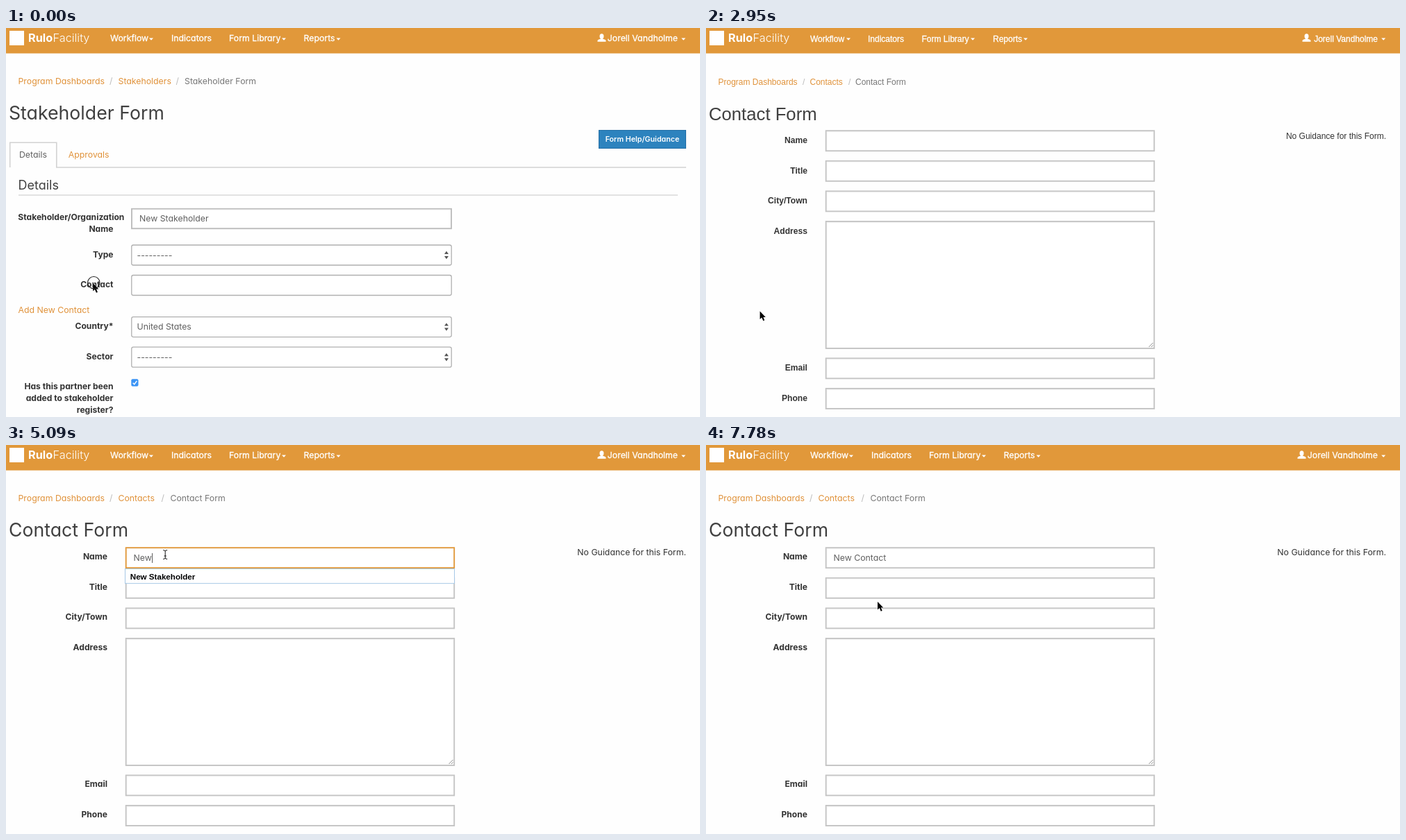
Write an HTML page that moves like this. It is 999 px wide and 561 px high and loops after 8000 ms.

```html
<!DOCTYPE html>
<html lang="en">
<head>
<meta charset="utf-8">
<title>Contact form</title>
<style>
html, body { margin: 0; width: 100%; height: 100%; overflow: hidden; background: #fefefe; }
svg { display: block; width: 999px; height: 561px; }
text { white-space: pre; }
.round { font-family: Inter, "Open Sans", sans-serif; font-size: 12.3px; font-feature-settings: "cv11"; }
.plain { font-family: "Liberation Sans", Arial, sans-serif; font-size: 12px; }
.nav { fill: #fff; stroke: #fff; stroke-width: .3; }
.link { fill: #e0923a; }
.hover { fill: #b56c1c; text-decoration: underline; }
.muted { fill: #777; }
.slash { fill: #bbb; }
.body { fill: #333; }
.value { fill: #606060; }
.label { fill: #333; font-weight: 700; font-size: 12.1px; }
.title { fill: #404040; font-size: 26.7px; }
.plain .title { font-size: 25.7px; }
.section { fill: #404040; font-size: 18px; }
.button { fill: #fff; font-size: 10.7px; font-weight: 600; }
.brand { fill: #fff; font: 300 16.3px Inter, sans-serif; }
.option { fill: #000; font: 700 11.6px "Liberation Sans", Arial, sans-serif; }
</style>
</head>
<body>
<svg id="stage" viewBox="0 0 999 561" xmlns="http://www.w3.org/2000/svg"></svg>
<script>
const DURATION = 8000;
const GREY = '#c4c4c4', ORANGE = '#e1983a';
const stage = document.getElementById('stage');

// Each step changes part of the state at its time.
const steps = [
  [0, { page: 'stakeholder', font: 'round', cursor: 'arrow', at: [125.2, 368], ring: true, hover: false,
        name: '', caret: false, border: GREY, options: [] }],
  [270, { at: [79, 396], ring: false }],
  [540, { at: [79.7, 398], ring: true }],
  [800, { cursor: 'hand', at: [77.7, 408], ring: false, hover: true }],
  [1070, { ring: true }],
  [1330, { page: 'blank', cursor: 'arrow', at: [77.6, 408.5], ring: false }],
  [2950, { page: 'contact', font: 'plain' }],
  [3220, { font: 'round' }],
  [3480, { cursor: 'beam', at: [218, 220] }],
  [3750, { at: [230.5, 168] }],
  [4010, { at: [229.2, 158], ring: true, caret: true }],
  [4280, { ring: false, border: ORANGE }],
  [4550, { caret: false }],
  [4820, { name: 'N', caret: true, options: ['South Velda', 'name', 'np Dvok test', 'Name Table',
           'New Stakeholder', 'NP Dvok test stakeholder'] }],
  [5090, { name: 'New', options: ['New Stakeholder'] }],
  [5360, { name: 'New ' }],
  [5900, { name: 'New Con', options: [] }],
  [6170, { name: 'New Conta' }],
  [6430, { name: 'New Contac' }],
  [6700, { name: 'New Contact' }],
  [7240, { cursor: 'arrow', at: [247, 222], caret: false }],
  [7510, { at: [247, 226], ring: true, border: '#d3ae80' }],
  [7780, { ring: false, border: GREY }]
];

const text = (x, y, str, cls, anchor = 'start') =>
  `<text x="${x}" y="${y}" class="${cls}" text-anchor="${anchor}">${str}</text>`;
const rect = (x, y, w, h, fill, extra = '') =>
  `<rect x="${x}" y="${y}" width="${w}" height="${h}" fill="${fill}" ${extra}/>`;
const path = (d, stroke, width = 1, fill = 'none') =>
  `<path d="${d}" stroke="${stroke}" stroke-width="${width}" fill="${fill}"/>`;
const chevron = x => path(`M${x} 14.5h6l-3 3.2z`, 'none', 0, '#fff');

function field(x, y, w, h, color = GREY) {
  return rect(x, y, w, h, '#fff', `stroke="${color}" stroke-width="1.9"`) +
    path(`M${x + 1} ${y + 1.4}h${w - 2}`, '#f0f0f0', .8);
}

function softField(y, h) {
  return rect(180.8, y, 460.4, h, '#fff', 'rx="2.5" stroke="#b0b0b0" stroke-width="1.3"');
}

function select(y, value) {
  const mid = y + 14.5;
  return softField(y, 29) + text(188.5, mid + 4, value, 'value') +
    path(`M631 ${mid - 1.5}h6l-3 -4.2zM631 ${mid + 1.5}h6l-3 4.2z`, 'none', 0, '#555');
}

function header(round) {
  const y = round ? 19 : 20;
  const [indicators, library, reports] = round ? [238, 321, 428.5] : [233, 310.5, 413];
  const icon = round ? 851.5 : 858.5;
  return rect(0, 0, 999, 36.6, ORANGE) +
    rect(5, 4, 21, 21, '#fff') +
    '<text x="32" y="20.3" class="brand"><tspan font-weight="700">Rulo</tspan><tspan x="67.5">Facility</tspan></text>' +
    text(150, y, 'Workflow', 'nav') + chevron(round ? 206 : 202) +
    text(indicators, y, 'Indicators', 'nav') +
    text(library, y, 'Form Library', 'nav') + chevron(round ? 397 : 381) +
    text(reports, y, 'Reports', 'nav') + chevron(round ? 475.5 : 457) +
    `<ellipse cx="${icon + 6}" cy="12" rx="3" ry="3.7" fill="#fff"/>` +
    path(`M${icon} 19.7v-1.6q.3 -1.2 4.6 -2.6v-1.5h2.8v1.5q4.3 1.4 4.6 2.6v1.6z`, 'none', 0, '#fff') +
    text(967, y, 'Jorell Vandholme', 'nav', 'end') + chevron(972.2);
}

function crumbs(y, first, xs, parent, current) {
  return text(17.5, y, first, 'link') + text(xs[0], y, '/', 'slash') + text(xs[1], y, parent, 'link') +
    text(xs[2], y, '/', 'slash') + text(xs[3], y, current, 'muted');
}

function stakeholderPage(s) {
  const label = (y, str) => text(154.5, y, str, 'label', 'end');
  return header(true) +
    crumbs(81, 'Program Dashboards', [149, 161.5, 244.5, 257], 'Stakeholders', 'Stakeholder Form') +
    text(4, 132, 'Stakeholder Form', 'title') +
    rect(853.5, 147.5, 125, 26, '#2d83be', 'stroke="#2470a7"') +
    text(916, 164, 'Form Help/Guidance', 'button', 'middle') +
    path('M5.7 201V165.2H72.8V201H979', '#d2d2d2', 1.6) +
    text(19, 186.5, 'Details', 'value') + text(89.8, 186.5, 'Approvals', 'link') +
    text(17.5, 233, 'Details', 'section') + path('M18 241H967', '#d8d8d8', 1.3) +
    text(17.3, 277, 'Stakeholder/Organization', 'label') + label(294, 'Name') +
    field(181, 260.8, 460, 28.4, '#bdbdbd') + text(192, 279, 'New Stakeholder', 'value') +
    label(331, 'Type') + select(313, '---------') +
    label(374, 'Contact') + softField(356.5, 29) +
    text(17.5, 410.5, 'Add New Contact', s.hover ? 'hover' : 'link') +
    label(434, 'Country*') + select(416.6, 'United States') +
    label(477.5, 'Sector') + select(460.2, '---------') +
    label(521, 'Has this partner been') + label(538, 'added to stakeholder') + label(555, 'register?') +
    rect(180.3, 506.3, 10.2, 10.4, '#3b94f5', 'rx="2"') +
    path('M182.7 511.8l2 2.2 3.6 -5', '#fff', 1.4);
}

function contactPage(s) {
  const round = s.font === 'round', dy = round ? 0 : 1;
  const rows = [['Name', 148.2, 29], ['Title', 191.8, 29], ['City/Town', 235.4, 29],
    ['Address', 279, 183], ['Email', 476.4, 29], ['Phone', 520, 29]];
  const fields = rows.map(([name, y, h], i) =>
    text(146, y + 16.8 + dy, name, 'label', 'end') +
    field(172.7, y, 472.5, h, i ? GREY : s.border)).join('');
  const xs = round ? [149, 161.5, 223.5, 236.5] : [139, 149.5, 205, 215];
  return header(round) +
    crumbs(81 + dy, 'Program Dashboards', xs, 'Contacts', 'Contact Form') +
    text(4, 132 + dy, 'Contact Form', 'title') +
    text(979, 159 + dy, 'No Guidance for this Form.', 'body', 'end') +
    fields + path('M637.5 460l6 -6M641 460l2.5 -2.5', '#888') +
    `<text id="name" x="183.5" y="167" class="value">${s.name}</text>` +
    '<path id="caret" stroke="#555" stroke-width="1"/>' + menu(s.options);
}

function menu(options) {
  if (!options.length) return '';
  const step = 20.55;
  return rect(171.5, 178.5, 474, options.length * step + .6, '#fff', 'stroke="#a6c8e6"') +
    options.map((o, i) => text(178.8, 194.2 + i * step, o, 'option')).join('');
}

const cursors = {
  arrow: '<path d="M0 0V11.6L2.7 9.1L4.7 13.8L6.7 12.9L4.8 8.4H8.2Z" fill="#000" stroke="#fff" stroke-width=".8" paint-order="stroke"/>',
  beam: path('M-3 -6.3Q0 -6.3 0 -4.8V5Q0 6.5 -3 6.5M3 -6.3Q0 -6.3 0 -4.8M0 5Q0 6.5 3 6.5M-1.6 2H1.6', '#111', 1),
  hand: path('M0 8.5V2Q0 .8 1.2 .8T2.4 2V6Q4.6 5 5 6.6Q7 5.8 7.3 7.3Q9.2 6.8 9.2 8.6V11.5L8 16H1.2L-3.4 10.4Q-4 8.6 -2.4 8.6Z', '#000', 1, '#fff')
};

function pointer(s) {
  const [x, y] = s.at;
  const ring = s.ring ? '<circle cx="1.1" cy="-.8" r="8.7" fill="none" stroke="#222" stroke-width="1.1"/>' : '';
  return `<g transform="translate(${x} ${y})">${cursors[s.cursor]}${ring}</g>`;
}

const pages = { stakeholder: stakeholderPage, contact: contactPage, blank: () => '' };

function draw(s) {
  stage.innerHTML = rect(0, 0, 999, 561, '#fefefe') +
    `<g class="${s.font}">${pages[s.page](s)}</g>` + pointer(s);
  if (s.caret) {
    const width = s.name ? document.getElementById('name').getComputedTextLength() : 0;
    document.getElementById('caret').setAttribute('d', `M${184.3 + width} 156V170`);
  }
}

let shown = -1;
function tick() {
  const t = performance.now() % DURATION;
  const past = steps.filter(([start]) => start <= t);
  if (past.length !== shown) {
    shown = past.length;
    draw(Object.assign({}, ...past.map(([, change]) => change)));
  }
  requestAnimationFrame(tick);
}
tick();
</script>
</body>
</html>
```
